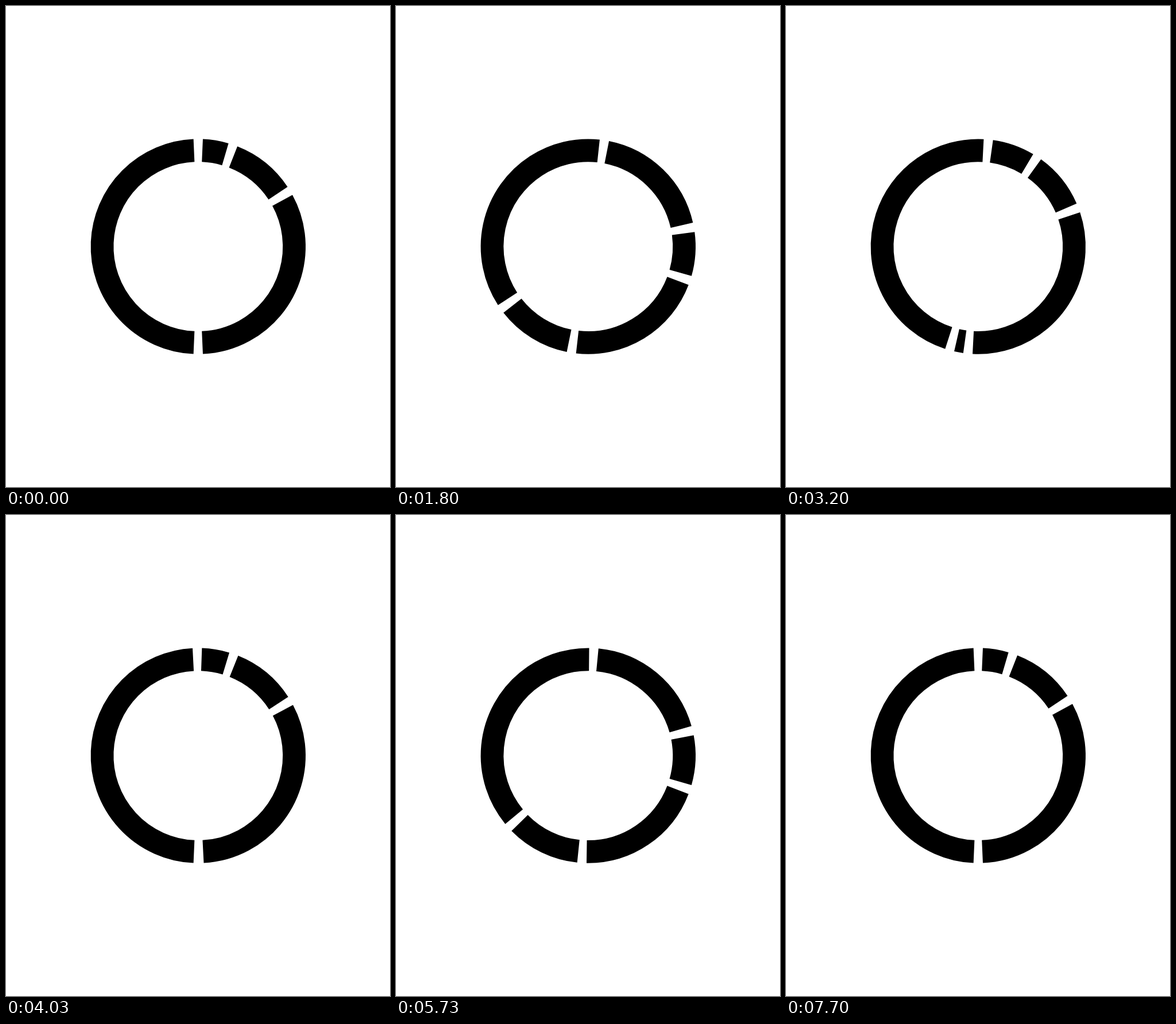
These frames come from a looping animation (669x837 px, 8.01 s). An HTML page with a canvas:

```html
<!DOCTYPE html>
<html lang="en">
<head>
<meta charset="utf-8">
<title>Segmented ring</title>
<style>
html, body { margin: 0; width: 100%; height: 100%; overflow: hidden; background: #fff; }
canvas { display: block; }
</style>
</head>
<body>
<canvas id="stage" width="669" height="837"></canvas>
<script>
const ctx = document.getElementById('stage').getContext('2d');
const LOOP = 8010;
const GAP = 5;

// Centres of the five gaps in each pose, in degrees clockwise from the top.
// In the first pose two gaps coincide, so only four segments show.
const poses = [
  [0, 18.9, 58.8, 180, 180],
  [-38.5, 54, 108.6, 142.1, 180],
  [26.7, 89.5, 108.3, 206.9, 255.4]
];

// cubic-bezier(1/6, 0, 1/3, 1): x = (s + s^3) / 2, solved by Newton's method
function ease(x) {
  let s = x;
  for (let i = 0; i < 8; i++) s -= (s + s ** 3 - 2 * x) / (1 + 3 * s * s);
  return s * s * (3 - 2 * s);
}

const radians = deg => (deg - 90) * Math.PI / 180;

function draw(time) {
  // 30 steps per second, with every third one held over
  const step = 3 * Math.floor(time / 100) + (time % 100 >= 30 ? 1 : 0);
  const index = Math.floor(step / 40) % 3;
  const next = poses[(index + 1) % 3];
  const progress = ease(Math.min(1, step % 40 / 30));
  const gaps = poses[index].map((a, i) => a + (next[i] - a) * progress);

  ctx.clearRect(0, 0, 669, 837);
  ctx.lineWidth = 39.8;
  gaps.forEach((gap, i) => {
    const start = gap + GAP / 2;
    const end = (gaps[i + 1] ?? gaps[0] + 360) - GAP / 2;
    if (end <= start) return;
    ctx.beginPath();
    ctx.arc(334.8, 418.6, 167.3, radians(start), radians(end));
    ctx.stroke();
  });
}

const begin = performance.now();
function tick() {
  draw((performance.now() - begin) % LOOP);
  requestAnimationFrame(tick);
}
tick();
</script>
</body>
</html>
```
